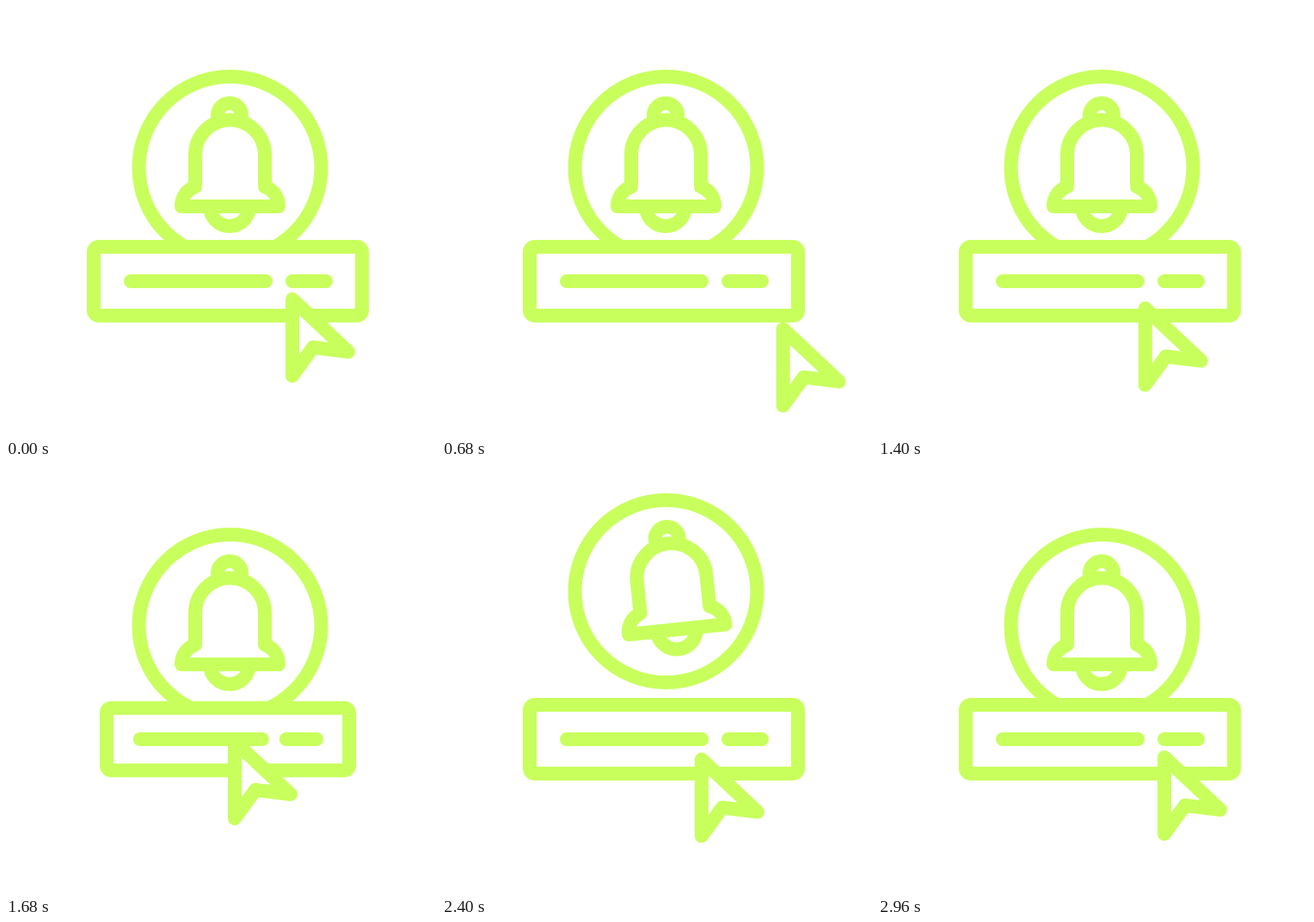
An HTML page that plays this animation: 500x500 px, repeating every 3 s.

```html
<!DOCTYPE html>
<html lang="en">
<head>
<meta charset="utf-8">
<title>Notification bell</title>
<style>
  html, body { margin: 0; width: 100%; height: 100%; overflow: hidden; background: #fff; }
  svg { display: block; width: 100%; height: 100%; }
  .ink { fill: none; stroke: #c8ff5c; stroke-width: 16; stroke-linecap: round; stroke-linejoin: round; }
  .solid { fill: #fff; }
  #bar * { vector-effect: non-scaling-stroke; }
</style>
</head>
<body>
<svg viewBox="0 0 500 500" class="ink">
  <g id="badge">
    <circle cx="260.5" cy="188" r="106"/>
    <g id="bell">
      <path d="M246 127a14 14 0 0 1 28 0"/>
      <path d="M204 233H317C317 222 311 214 301 210V173A40.5 40.5 0 0 0 220 173V210C210 214 204 222 204 233Z"/>
      <path d="M237 233a23 23 0 0 0 46 0"/>
    </g>
  </g>
  <g id="bar">
    <rect class="solid" x="102" y="280" width="312" height="80" rx="6"/>
    <path d="M145 320H302M333 320H372"/>
  </g>
  <path id="cursor" class="solid" d="M333 341L398 402L357 397L333 430Z"/>
</svg>
<script>
const LOOP = 3000, STEP = 40;
const [badge, bell, bar, cursor] = ["badge", "bell", "bar", "cursor"].map(id => document.getElementById(id));

const easeIn = power => u => u ** power;
const easeOut = power => u => 1 - (1 - u) ** power;
const smooth = u => (1 - Math.cos(Math.PI * u)) / 2;
const lateSwing = u => Math.sin(Math.PI / 2 * u * u);

// Share of a move by `delta` that is done at time t; moves add up.
function move(t, from, to, delta, ease = smooth) {
  const u = Math.min(1, Math.max(0, (t - from) / (to - from)));
  return delta * ease(u);
}

const cursorX = t =>
  move(t, 40, 870, 88, easeIn(1.25)) +
  move(t, 870, 1680, -155, easeOut(1.17)) +
  move(t, 1680, 2880, 67, lateSwing);

const cursorY = t =>
  move(t, 40, 1090, 44, easeOut(1.65)) +
  move(t, 1090, 1680, -62) +
  move(t, 1680, 2540, 22, easeOut(1.5)) +
  move(t, 2540, 2840, -4);

// Press, spring past full size, settle.
const barScale = t => 1 +
  move(t, 1520, 1680, -0.096) +
  move(t, 1680, 1760, 0.151) +
  move(t, 1760, 1900, -0.055);

const badgeY = t => move(t, 1680, 1880, -51, easeOut(3)) + move(t, 2150, 2960, 51);

// One and a half swings while the badge is up.
const bellAngle = t => 6.9 * Math.sin(move(t, 1700, 2960, 3 * Math.PI, easeIn(1)));

function draw(t) {
  badge.setAttribute("transform", `translate(0 ${badgeY(t)})`);
  bell.setAttribute("transform", `rotate(${bellAngle(t)} 260 110)`);
  bar.setAttribute("transform", `translate(258 320) scale(${barScale(t)}) translate(-258 -320)`);
  cursor.setAttribute("transform", `translate(${cursorX(t)} ${cursorY(t)})`);
}

const start = performance.now();
function tick() {
  const t = (performance.now() - start) % LOOP;
  draw(Math.floor(t / STEP) * STEP);
  requestAnimationFrame(tick);
}
tick();
</script>
</body>
</html>
```
